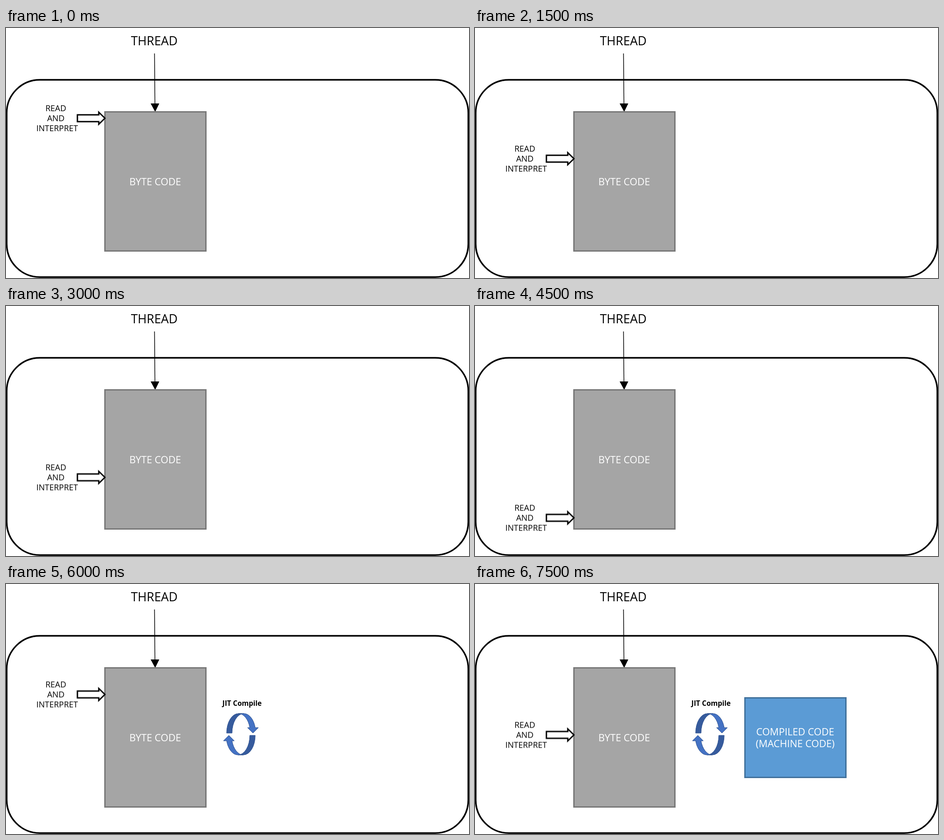
Animation of 1018 by 550 pixels, one loop 8 s. Source, as an HTML page:

```html
<!DOCTYPE html>
<html lang="en">
<head>
<meta charset="utf-8">
<title>Interpreting and compiling byte code</title>
<style>
  html, body { margin: 0; width: 100%; height: 100%; overflow: hidden; background: #fff; }
  svg { display: block; width: 1018px; height: 550px; }
  text { font-family: "Open Sans", "Noto Sans", sans-serif; text-anchor: middle; }
  .title { font-size: 26.8px; }
  .step { font-size: 18px; }
  .box { font-size: 21.7px; fill: #fff; }
  .label { font-size: 15.5px; font-weight: 700; }
  .outline { fill: #fff; stroke: #000; stroke-width: 3; }
  .turn { stroke: #2f528f; stroke-width: 1; }
</style>
</head>
<body>
<svg viewBox="0 0 1018 550">
  <defs>
    <g id="turn" class="turn">
      <path fill="#365b9d" d="M485 328A26 43 0 0 1 511 285H523A26 43 0 0 0 497 328Z"/>
      <path fill="#4472c4" d="M511 285H523A26 43 0 0 1 548 316H555L543 328L531 316H536A26 43 0 0 0 511 285Z"/>
    </g>
  </defs>

  <rect class="outline" x="1.5" y="114" width="1015" height="434" rx="73" style="stroke-width:3.5"/>

  <text class="title" x="326" y="38">THREAD</text>
  <path d="M326.5 56L327.5 168" stroke="#000" stroke-width="1.5"/>
  <path d="M318 166H337L328 184.5Z"/>

  <rect x="217.5" y="184.5" width="222" height="306" fill="#a5a5a5" stroke="#787878" stroke-width="3"/>
  <text class="box" x="328" y="346">BYTE CODE</text>

  <g id="reader">
    <text class="step" x="109.5" y="182.5">READ</text>
    <text class="step" x="109.5" y="204.5">AND</text>
    <text class="step" x="112.5" y="227">INTERPRET</text>
    <path class="outline" d="M157 191H204V185.3L217.5 198.5L204 211.7V206H157Z"/>
  </g>

  <g id="compiler">
    <text class="label" x="519" y="268">JIT Compile</text>
    <use href="#turn"/>
    <use href="#turn" transform="rotate(180 516.5 330.5)"/>
  </g>

  <g id="compiled">
    <rect x="593.5" y="250.5" width="222" height="175" fill="#5b9bd5" stroke="#41719c" stroke-width="3"/>
    <text class="box" x="704" y="333">COMPILED CODE</text>
    <text class="box" x="704" y="359">(MACHINE CODE)</text>
  </g>
</svg>
<script>
  const LOOP = 8000, STEP = 750;
  // One row per step: reader offset, compiler shown, compiled code shown.
  const steps = [
    [0, 0, 0], [44.5, 0, 0], [89, 0, 0], [134, 0, 0], [178.5, 0, 0], [223, 0, 0], [267.5, 0, 0],
    [0, 1, 0], [44.5, 1, 0], [89, 1, 1], [133.5, 1, 1]
  ];

  function play(id, pose) {
    const frames = steps.map((row, i) => ({ ...pose(row), offset: i * STEP / LOOP, easing: "step-end" }));
    frames.push({ ...pose(steps.at(-1)), offset: 1 });
    const motion = document.getElementById(id).animate(frames, { duration: LOOP, iterations: Infinity });
    motion.startTime = 0;
  }

  play("reader", ([y]) => ({ transform: `translateY(${y}px)` }));
  play("compiler", ([, shown]) => ({ opacity: shown }));
  play("compiled", ([, , shown]) => ({ opacity: shown }));
</script>
</body>
</html>
```
